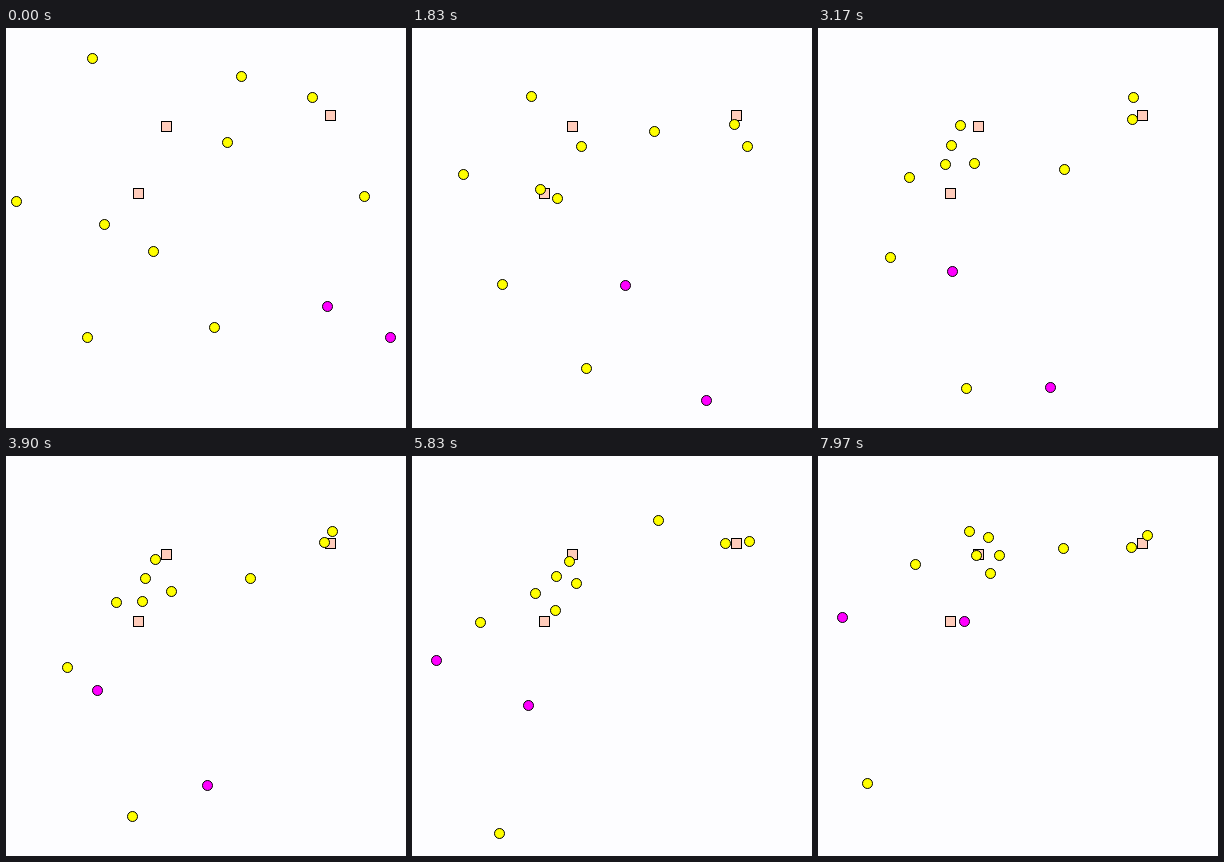
An HTML page with a canvas for the animation above (8 s loop, 400 px wide and 400 px high).

```html
<!DOCTYPE html>
<html lang="en">
<head>
<meta charset="utf-8">
<title>Swarm</title>
<style>
html, body { margin: 0; width: 100%; height: 100%; overflow: hidden; background: #fdfdff; }
canvas { display: block; width: 400px; height: 400px; }
</style>
</head>
<body>
<canvas id="stage" width="400" height="400"></canvas>
<script>
const ctx = document.getElementById('stage').getContext('2d');
const LOOP = 8000, STEPS = 240;
const YELLOW = '#ffff00', MAGENTA = '#ff00ff', PEACH = '#ffccbb';

// Straight runs between turning points at a constant speed in pixels per step
function run(speed, ...turns) {
  return step => {
    let left = step * speed;
    for (let i = 1; i < turns.length; i++) {
      const [ax, ay] = turns[i - 1], [bx, by] = turns[i];
      const length = Math.hypot(bx - ax, by - ay);
      if (left < length) return [ax + (bx - ax) * left / length, ay + (by - ay) * left / length];
      left -= length;
    }
    return turns[turns.length - 1];
  };
}

// Smooth curve that reaches its points at even intervals over the loop
function drift(...points) {
  const legs = points.length - 1;
  return step => {
    const pos = step / STEPS * legs, i = Math.floor(pos), u = pos - i;
    const at = n => points[Math.max(0, Math.min(legs, n))];
    return [0, 1].map(axis => {
      const [a, b, c, d] = [i - 1, i, i + 1, i + 2].map(n => at(n)[axis]);
      return b + u / 2 * (c - a + u * (2 * a - 5 * b + 4 * c - d + u * (3 * (b - c) + d - a)));
    });
  };
}

// Side-to-side motion that builds up once the mover has arrived
function sway(path, peak) {
  return step => {
    const [x, y] = path(step);
    const size = 7 * Math.max(0, Math.min(1, (step - 96) / 40));
    return [x + size * Math.cos((step - peak) * Math.PI / 18), y];
  };
}

const flock = [
  drift([86, 30], [115, 63], [142, 97], [155, 105], [158, 102], [170, 81]),
  drift([221, 114], [176, 118], [133, 117], [152, 127], [140, 112], [151, 75]),
  drift([98, 196], [127, 166], [127, 136], [148, 160], [142, 147], [172, 117]),
  drift([147, 223], [144, 177], [156, 135], [173, 139], [161, 119], [181, 99]),
  drift([10, 173], [45, 147], [92, 149], [126, 141], [123, 132], [158, 99])
];
const pair = [
  sway(drift([306, 69], [322, 98], [315, 69], [336, 87], [336, 82], [336, 79]), 148),
  sway(drift([358, 168], [339, 124], [314, 91], [318, 85], [318, 88], [318, 91]), 153)
];
const loners = [
  drift([81, 309], [91, 262], [72, 228], [52, 188], [79, 153], [97, 108]),
  run(1, [208, 299], [185, 315], [164, 361], [127, 359], [97, 390], [49, 327]),
  run(1, [235, 48], [247, 141], [243, 141], [246, 51], [239, 50], [245, 92])
];
const hunters = [
  run(2, [321, 278], [5, 218], [5, 210], [148, 164]),
  run(2, [384, 309], [266, 391], [24, 161])
];
const squares = [[160, 98], [132, 165], [324, 87]];

function drawSquare([x, y]) {
  ctx.fillStyle = PEACH;
  ctx.fillRect(x - 4.5, y - 4.5, 10, 10);
  ctx.strokeRect(x - 4.5, y - 4.5, 10, 10);
}

function drawDot(path, step, color) {
  const [x, y] = path(step).map(Math.round);
  ctx.fillStyle = color;
  ctx.beginPath();
  ctx.arc(x + 0.5, y + 0.5, 5, 0, Math.PI * 2);
  ctx.fill();
  ctx.stroke();
}

function draw(step) {
  ctx.fillStyle = '#fdfdff';
  ctx.fillRect(0, 0, 400, 400);
  ctx.strokeStyle = '#000';
  ctx.lineWidth = 1;
  squares.forEach(drawSquare);
  for (const path of [...flock, ...pair, ...loners]) drawDot(path, step, YELLOW);
  for (const path of hunters) drawDot(path, step, MAGENTA);
}

const start = performance.now();
function tick() {
  const t = (performance.now() - start) % LOOP;
  draw(Math.min(STEPS - 1, Math.floor((t + 5) * STEPS / LOOP)));
  requestAnimationFrame(tick);
}
tick();
</script>
</body>
</html>
```
